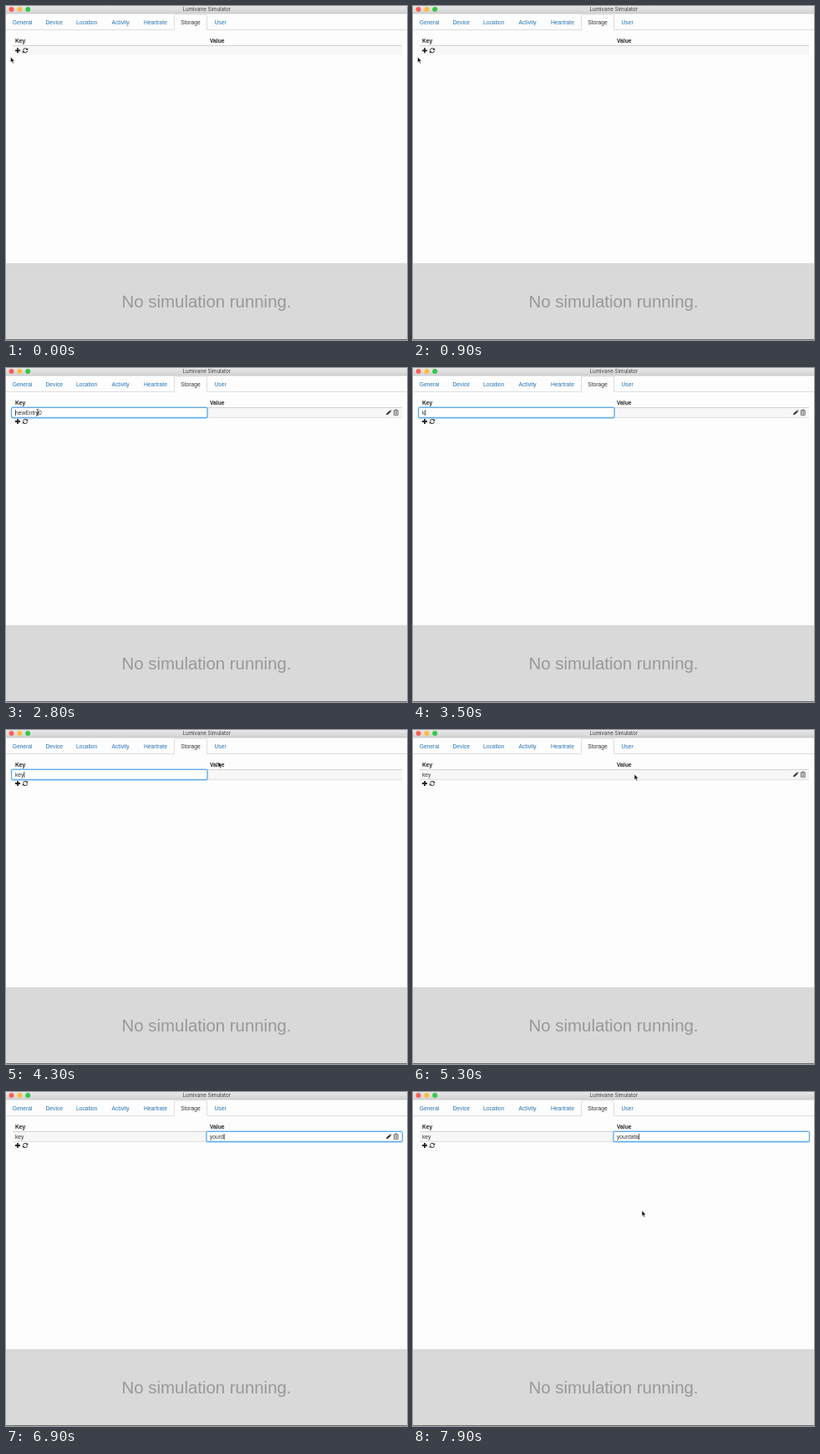
These frames come from a looping animation (480x400 px, 8 s). An HTML page:

```html
<!DOCTYPE html>
<html lang="en">
<head>
<meta charset="utf-8">
<title>Storage panel</title>
<style>
html, body { margin: 0; width: 100%; height: 100%; overflow: hidden; background: #fdfdfd; }
svg { display: block; width: 480px; height: 400px; font: 6.7px "Liberation Sans", Arial, sans-serif; }
text { fill: #333; white-space: pre; }
.tab { fill: #2573b3; }
.bold { font-weight: bold; fill: #222; }
.title { font: 6.2px Inter, "Liberation Sans", sans-serif; fill: #3c3c3c; text-anchor: middle; }
.status { font-size: 20.4px; fill: #989898; }
.line { fill: none; stroke: #ddd; stroke-width: 1; }
</style>
</head>
<body>
<svg viewBox="0 0 480 400">
  <defs>
    <linearGradient id="bar" x2="0" y2="1">
      <stop stop-color="#e8e8e8"/><stop offset="1" stop-color="#d2d2d2"/>
    </linearGradient>
  </defs>
  <rect width="480" height="400" fill="#fdfdfd"/>
  <rect width="480" height="9" fill="url(#bar)"/>
  <path d="M0 9H480" stroke="#bdbdbd" stroke-width=".7"/>
  <circle cx="6.5" cy="4" r="3" fill="#fc5f57"/>
  <circle cx="16.4" cy="4" r="3" fill="#fdbc40"/>
  <circle cx="26.2" cy="4" r="3" fill="#34c84a"/>
  <text class="title" x="240.3" y="6.3">Lumivane Simulator</text>

  <path class="line" d="M0 28.5H201.5V11.5Q201.5 10 203 10H239Q240.5 10 240.5 11.5V28.5H480"/>
  <g id="tabs"></g>

  <text class="bold" x="11" y="44.3">Key</text>
  <text class="bold" x="244" y="44.3">Value</text>
  <rect x="8" y="48" width="466" height="11" fill="#f7f7f7"/>
  <path class="line" d="M8 47.5H474" style="stroke:#d2d2d2"/>
  <path id="rowLine" class="line" d="M8 59.3H474"/>

  <g id="focus" fill="#fff">
    <rect y="46.9" height="13" rx="2" fill="none" stroke="#b9dcf8" stroke-width="2"/>
    <rect y="47.5" height="11.8" rx="1.4" stroke="#62abe6" stroke-width="1.2"/>
  </g>
  <text id="key" x="11" y="55.7"></text>
  <text id="value" x="244" y="55.7"></text>
  <path id="caret" d="M0 50V57" stroke="#222" stroke-width=".8"/>

  <g id="tools">
    <path d="M11 0H17M14 -3V3" stroke="#222" stroke-width="1.8"/>
    <g fill="none" stroke="#222" stroke-width="1">
      <path d="M20.4 -.5A2.7 2.7 0 0 1 25.2 -1.5M25.6 .5A2.7 2.7 0 0 1 20.8 1.5"/>
    </g>
    <path d="M26.2 -3.1V-.5H23.6ZM19.8 3.1V.5H22.4Z" fill="#222"/>
  </g>
  <g id="actions" fill="#333">
    <path d="M455 56.3L455.6 54.2L459.3 50.9L460.8 52.4L457.1 55.8ZM459.7 50.5L460.3 50L461.7 51.5L461.1 52.1Z"/>
    <g fill="none" stroke="#555" stroke-width=".8">
      <path d="M463.7 51.2H469.9M465.5 51V50H468.1V51M464.4 51.5V56.4H469.2V51.5M466 52.3V55.5M467.6 52.3V55.5"/>
    </g>
  </g>

  <rect y="308" width="480" height="92" fill="#d9d9d9"/>
  <path d="M0 399.5H480" stroke="#6c6c6c"/>
  <text class="status" x="138.6" y="361">No simulation running.</text>

  <path id="arrow" d="M0 0V6.7L1.5 5.3L2.6 7.9L3.8 7.4L2.7 4.9H4.8Z" fill="#111" stroke="#fff" stroke-width=".5"/>
  <path id="beam" d="M-1.4 -3.5Q0 -3.5 0 -2.7Q0 -3.5 1.4 -3.5M0 -2.7V2.7M-1.4 3.5Q0 3.5 0 2.7Q0 3.5 1.4 3.5M-.9 .9H.9" fill="none" stroke="#222" stroke-width=".8"/>
</svg>
<script>
const LOOP = 8000;
const el = id => document.getElementById(id);
const show = (id, on) => el(id).setAttribute("visibility", on ? "visible" : "hidden");
const move = (id, x, y) => el(id).setAttribute("transform", `translate(${x} ${y})`);

const tabs = { General: 7.7, Device: 47.5, Location: 84, Activity: 126.5, Heartrate: 165, Storage: 209.3, User: 249.5 };
el("tabs").innerHTML = Object.entries(tabs).map(([name, x]) =>
  `<text x="${x}" y="21.7" class="${name === "Storage" ? "" : "tab"}">${name}</text>`).join("");

// Pointer stops: time, x, y
const stops = [
  [0, 5.5, 61], [900, 5.5, 61], [1500, 13.5, 53], [2150, 13.5, 53], [2550, 38, 53],
  [3900, 38, 53], [4250, 254, 38], [4350, 254, 38], [4700, 265, 53],
  [7300, 265, 53], [7800, 274, 142], [LOOP, 274, 142]
];
const ADDED = 2000;
const KEY_EDIT = [2700, 4800];
const VALUE_EDIT = [5700, LOOP];
const keyTimes = [3400, 3550, 3700];
const valueTimes = [6200, 6350, 6500, 6650, 6800, 7000, 7150, 7300];

const within = (t, [from, to]) => t >= from && t < to;
const typed = (word, times, t) => word.slice(0, times.filter(at => at <= t).length);

function pointerAt(t) {
  const i = stops.findIndex(stop => stop[0] > t);
  const [t0, x0, y0] = stops[i - 1], [t1, x1, y1] = stops[i];
  const p = (t - t0) / (t1 - t0), ease = p * p * (3 - 2 * p);
  return [x0 + (x1 - x0) * ease, y0 + (y1 - y0) * ease];
}

function draw(t) {
  const added = t >= ADDED;
  const editing = within(t, KEY_EDIT) ? "key" : within(t, VALUE_EDIT) ? "value" : "";
  const [x, y] = pointerAt(t);
  const overRow = y > 47 && y < 59.5;

  el("key").textContent = !added ? "" : t < 3100 ? "newEntry0" : typed("key", keyTimes, t);
  el("value").textContent = typed("yourdata", valueTimes, t);

  show("rowLine", added);
  show("actions", added && overRow);
  move("tools", 0, added ? 64 : 53.3);

  show("focus", editing);
  show("caret", editing);
  if (editing) {
    const left = editing === "key" ? 6.6 : 240;
    for (const box of el("focus").children) {
      box.setAttribute("x", left);
      box.setAttribute("width", 234.4);
    }
    const start = editing === "key" ? 11 : 244;
    const atStart = editing === "key" && t < 3100;
    move("caret", start + .4 + (atStart ? 0 : el(editing).getComputedTextLength()), 0);
  }

  // The pointer hides while typing.
  const hidden = within(t, [3100, 3900]) || within(t, [6100, 7300]);
  const overField = overRow && (editing === "key" ? x < 241 : editing === "value");
  show("arrow", !hidden && !overField);
  show("beam", !hidden && overField);
  move("arrow", x, y);
  move("beam", x, y);
}

const begin = performance.now();
function tick() {
  draw((performance.now() - begin) % LOOP);
  requestAnimationFrame(tick);
}
tick();
</script>
</body>
</html>
```
